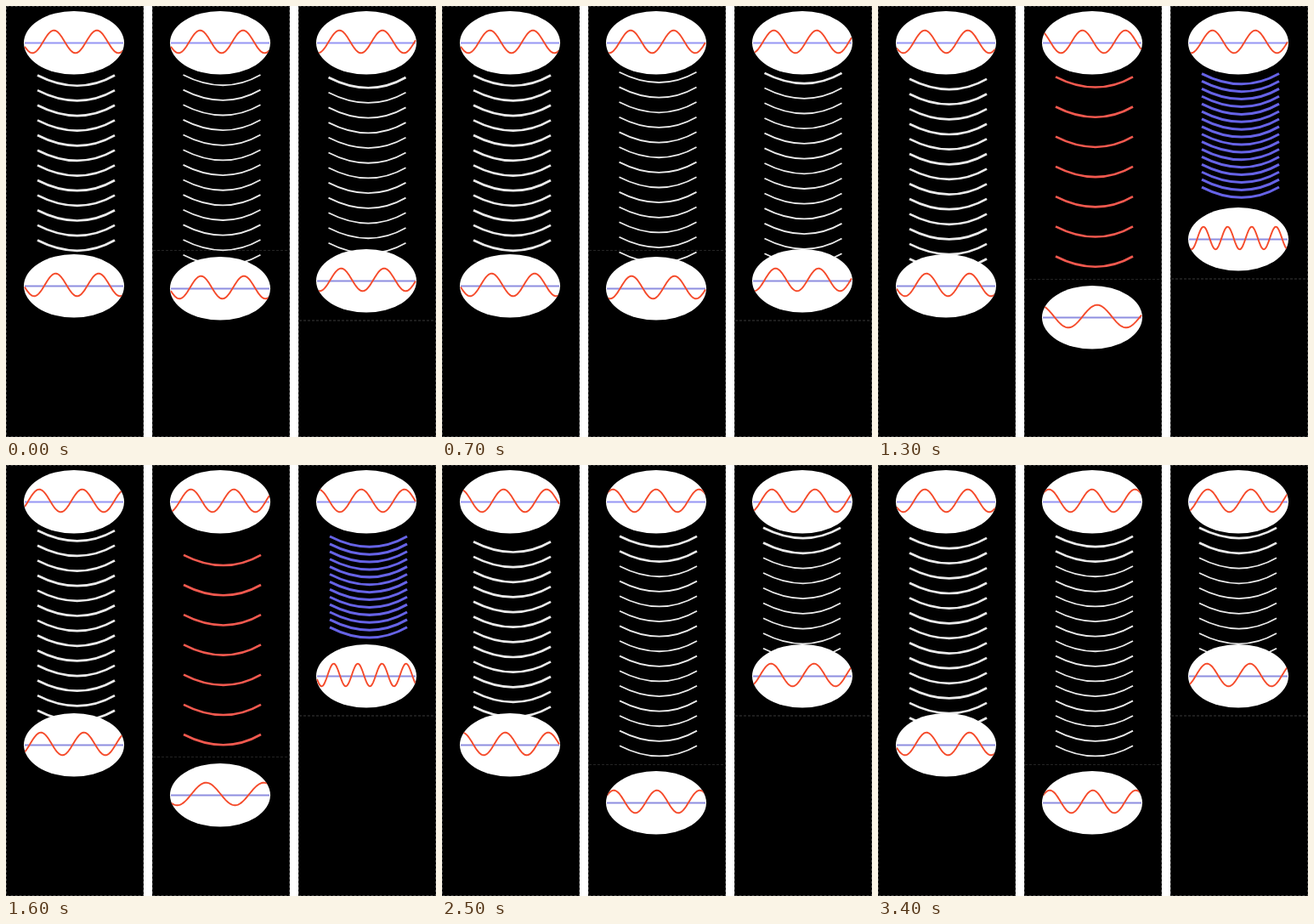
These frames come from a looping animation (506 px wide and 507 px high, 3.5 s). An HTML page with a canvas:

```html
<!DOCTYPE html>
<html lang="en">
<head>
<meta charset="utf-8">
<title>Waves from fixed and moving observers</title>
<style>
  html, body { margin: 0; width: 100%; height: 100%; overflow: hidden; background: #fff; }
  canvas { display: block; }
</style>
</head>
<body>
<canvas id="stage" width="506" height="507"></canvas>
<script>
const ctx = document.getElementById('stage').getContext('2d');
const STEP = 100, STEPS = 35, WAVE = 50.6;
const WHITE = '#ebebeb', RED = '#f2594f', BLUE = '#6663e6';

const clamp = (v, lo, hi) => Math.min(hi, Math.max(lo, v));

// Linear interpolation through [time, value] points, held at both ends
function track(points, n) {
  if (n <= points[0][0]) return points[0][1];
  for (let i = 1; i < points.length; i++) {
    const [a, p] = points[i - 1], [b, q] = points[i];
    if (n <= b) return p + (q - p) * (n - a) / (b - a);
  }
  return points[points.length - 1][1];
}

function line(x1, y1, x2, y2, color, width = 1, dash = []) {
  ctx.setLineDash(dash);
  ctx.strokeStyle = color;
  ctx.lineWidth = width;
  ctx.beginPath();
  ctx.moveTo(x1, y1);
  ctx.lineTo(x2, y2);
  ctx.stroke();
  ctx.setLineDash([]);
}

function panel(x) {
  ctx.fillStyle = '#000';
  ctx.fillRect(x, 0, 162, 507);
  ctx.strokeStyle = '#444';
  ctx.lineWidth = 1;
  ctx.setLineDash([3, 2]);
  ctx.strokeRect(x + 0.5, 0.5, 161, 506);
  ctx.setLineDash([]);
}

// Oval screen with a cosine whose crest is at x = peak
function scope(cx, cy, peak, wave, axis) {
  ctx.save();
  ctx.beginPath();
  ctx.ellipse(cx, cy + 0.3, 59, 37.3, 0, 0, 2 * Math.PI);
  ctx.fillStyle = '#fff';
  ctx.fill();
  ctx.clip();
  line(cx - 58, cy + 0.5, cx + 58, cy + 0.5, axis, 1.8);
  ctx.beginPath();
  for (let x = cx - 58; x <= cx + 58; x++)
    ctx.lineTo(x, cy - 1 - 13.3 * Math.cos(2 * Math.PI * (x - peak + 0.6) / wave));
  ctx.strokeStyle = '#f54a2a';
  ctx.lineWidth = 1.9;
  ctx.stroke();
  ctx.restore();
}

// Equally spaced wavefronts passing through y, kept between min and max
function fronts({ x, y, gap, min, max, color = WHITE, width = 1.8, thickTo = 0 }) {
  ctx.strokeStyle = color;
  y = min + ((y - min) % gap + gap) % gap;
  for (; y < max; y += gap) {
    ctx.lineWidth = y < thickTo ? 2.7 : width;
    ctx.beginPath();
    ctx.moveTo(x, y);
    ctx.quadraticCurveTo(x + 48, y + 24.5, x + 91, y);
    ctx.stroke();
  }
}

function screens(cx, lowY, top, low, wave = WAVE) {
  scope(cx, 43, top, WAVE, '#9696f4');
  scope(cx, lowY, low, wave, '#8e8ee0');
}

function still(n) {
  const k = n % 7, peak = 57 - 8.65 * k;
  panel(0);
  fronts({ x: 37, y: 81.5 + 6.6 * k, gap: 17.64, min: 76, max: k ? 299 : 292, width: 2.7 });
  screens(80, 329, peak, peak + 2);
}

function receding(n) {
  const y = clamp(344 + 7.33 * (n - 10), 332, 397);
  const top = track([[0, 229], [4, 197], [7, 172], [8, 178], [10, 163], [16, 117], [21, 79], [25, 50]], n);
  const moving = n >= 8 && n < 18;
  panel(172);
  line(173, y - 44.5, 333, y - 44.5, '#242424', 1, [3, 2]);
  if (moving)
    fronts({ x: 209, y: 96 + 7.5 * (n - 10), gap: 35.2, min: 75, max: y - 45, color: RED, width: 2.6 });
  else if (n < 8)
    fronts({ x: 208.5, y: 81 + 7.1 * n, gap: 17.64, min: 73, max: y - 28, thickTo: 76 });
  else
    fronts({ x: 209, y: 91 + 7 * (Math.min(n, 25) - 21), gap: 17.6, min: 75, max: y - 55, thickTo: 110 });
  if (moving) screens(252, y, top, 213 - 7.5 * (n - 10), 68);
  else screens(252, y, top, top + 1);
}

function approaching(n) {
  const y = clamp(300 - 8.67 * (n - 10), 248, 323);
  const top = track([[0, 393], [4, 362], [10, 319], [16, 267], [19.5, 237]], n);
  const moving = n >= 8 && n < 17;
  panel(344);
  line(345, y + 47, 505, y + 47, '#3a3a3a', 1, [3, 2]);
  if (moving)
    fronts({ x: 381, y: 84 + 7.42 * (n - 10), gap: 8.9, min: 76, max: y - 53, color: BLUE, width: 3 });
  else if (n < 8)
    fronts({ x: 379.5, y: 84 + 6.85 * n, gap: 17.7, min: 74.8, max: y - 28, thickTo: 96 });
  else
    fronts({ x: 378, y: 73.8 + 7 * (Math.min(n, 20) - 20), gap: 17.75, min: 71, max: y - 28, thickTo: 96 });
  if (moving) screens(424, y, top, 381 - 8.6 * (n - 10), 28.4);
  else screens(424, y, top, n < 8 ? top + 2 : top - 1);
}

const start = performance.now();

function draw() {
  const n = Math.floor((performance.now() - start) / STEP) % STEPS;
  ctx.fillStyle = '#fff';
  ctx.fillRect(0, 0, 506, 507);
  still(n);
  receding(n);
  approaching(n);
  requestAnimationFrame(draw);
}
draw();
</script>
</body>
</html>
```
